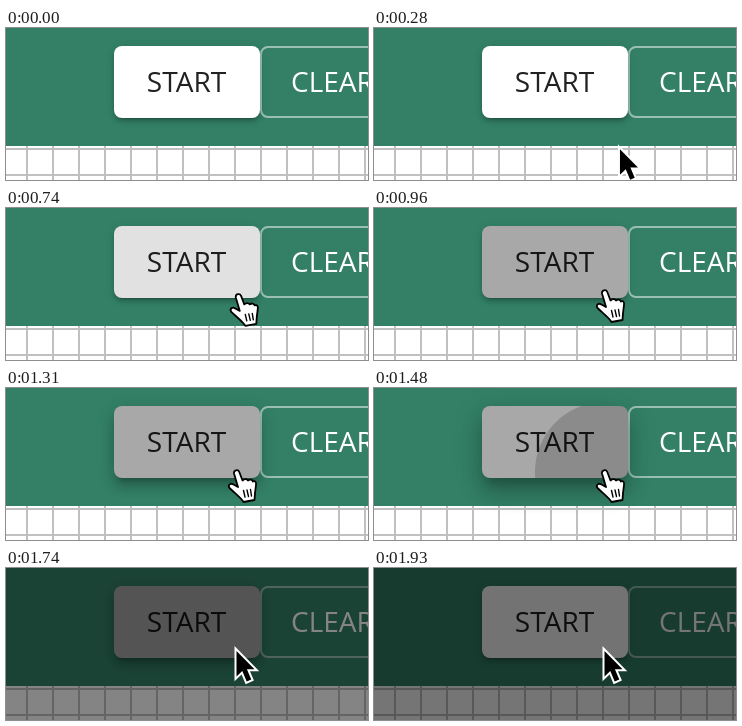
These frames come from a looping animation (362 px wide and 152 px high, 2.34 s). An HTML page:

```html
<!DOCTYPE html>
<html lang="en">
<head>
<meta charset="utf-8">
<style>
  html, body { margin: 0; width: 100%; height: 100%; overflow: hidden; }
  #stage { position: relative; width: 362px; height: 152px; overflow: hidden; background: #fff; }
  #stage > * { position: absolute; }
  svg { left: 0; top: 0; }
  #start { left: 108px; top: 18px; width: 146px; height: 72px; border-radius: 8px; }
  #overlay { inset: 0; background: #000; }
  text { font: 500 28px "Open Sans", "Noto Sans", sans-serif; }
</style>
</head>
<body>
<div id="stage">
  <svg width="362" height="152">
    <defs>
      <pattern id="grid" x="20" y="120" width="26" height="26" patternUnits="userSpaceOnUse">
        <path d="M0 1H26M1 0V26" stroke="#c0c0c0" stroke-width="2"/>
      </pattern>
    </defs>
    <rect y="118" width="362" height="34" fill="url(#grid)"/>
    <rect width="362" height="118" fill="#338067"/>
    <rect x="255" y="19" width="150" height="70" rx="7" fill="none" stroke="#fff" stroke-opacity=".5" stroke-width="2"/>
    <text x="285" y="64" fill="#fff">CLEAR</text>
  </svg>
  <div id="start"></div>
  <svg width="362" height="152">
    <text x="180.5" y="64" text-anchor="middle" fill="#000" fill-opacity=".87">START</text>
  </svg>
  <div id="overlay"></div>
  <svg width="362" height="152">
    <g id="cursor">
      <path id="arrow" d="M0 0V25.5L5.8 20L10.2 30.5L14.8 28.5L10.4 18.3H18Z" stroke="#fff" stroke-width="4" paint-order="stroke" stroke-miterlimit="6"/>
      <g id="hand" stroke="#000" stroke-width="1.8" stroke-linejoin="round" stroke-linecap="round">
        <path fill="#fff" d="M-2.5 2.5C-3 -1 1.5 -2 2.8 1L6 9.5C8 7.5 10.5 8 11.5 9.5C13.5 8 15.5 8.5 16.5 10.5C18.5 9.5 20 11 19.5 14L18.5 22L18 29L7 31C4 26 -2 22 -7 17C-9 14 -6 11.5 -3 13.5L1.5 16Z"/>
        <path fill="none" stroke-width="1.4" d="M7 19.5L8.5 26M10.5 19L12 25.5M14 18.5L15 25"/>
      </g>
    </g>
  </svg>
</div>
<script>
const LOOP = 2340;
const byId = id => document.getElementById(id);
const [start, overlay, cursor, arrow, hand] =
  ['start', 'overlay', 'cursor', 'arrow', 'hand'].map(byId);

// Standard material curve, cubic-bezier(.4, 0, .2, 1).
function ease(x) {
  if (x <= 0) return 0;
  if (x >= 1) return 1;
  let lo = 0, hi = 1;
  for (let i = 0; i < 16; i++) {
    const s = (lo + hi) / 2, r = 1 - s;
    if (1.2 * s * r * r + .6 * s * s * r + s ** 3 < x) lo = s; else hi = s;
  }
  return 3 * lo * lo * (1 - lo) + lo ** 3;
}

const progress = (t, from, length) => Math.min(1, Math.max(0, (t - from) / length));
const easeFrom = (t, from, length) => ease((t - from) / length);

// The picture rests between the hover, the press and the end.
function pausedTime(t) {
  if (t >= 960 && t < 1310) return 960;
  if (t >= 1790 && t < 1930) return 1790;
  return Math.min(t, 1930);
}

function drawButton(t) {
  const hover = easeFrom(t, 668, 250) - easeFrom(t, 1655, 250);
  const shade = Math.round(255 - 87 * hover);

  const grow = easeFrom(t, 1290, 550);
  const alpha = grow && .87 * (.1 + .2 * grow) * (1 - easeFrom(t, 1680, 330));
  const radius = 141 * grow;
  start.style.background =
    `radial-gradient(circle at 123px 66px, rgba(0,0,0,${alpha}) ${radius}px, transparent ${radius + 1}px) rgb(${shade},${shade},${shade})`;

  const lift = easeFrom(t, 1220, 280) - easeFrom(t, 1680, 130);
  start.style.boxShadow = `
    0 ${6 + 4 * lift}px ${2 + 8 * lift}px -5px rgba(0,0,0,.2),
    0 ${4 + 12 * lift}px ${4 + 16 * lift}px ${2 * lift}px rgba(0,0,0,.14),
    0 ${2 + 4 * lift}px ${10 + 18 * lift}px ${4 * lift}px rgba(0,0,0,.12)`;
}

function drawCursor(t) {
  const approach = progress(t, 30, 510);
  const settle = 1 - (1 - progress(t, 610, 350)) ** 2.4;
  const x = 248 - 12 * approach ** 2.5 - 5.5 * settle;
  const y = 153 - 58 * approach ** .85 - 12 * settle;
  const pointing = t >= 660 && t < 1670;
  cursor.setAttribute('transform', `translate(${x} ${y})`);
  cursor.style.display = t < 30 ? 'none' : '';
  hand.style.display = pointing ? '' : 'none';
  arrow.style.display = pointing ? 'none' : '';
}

function render(now) {
  const t = pausedTime(now);
  drawButton(t);
  drawCursor(t);
  overlay.style.opacity = .54 * easeFrom(t, 1660, 130);
}

const origin = performance.now();
function tick() {
  render((performance.now() - origin) % LOOP);
  requestAnimationFrame(tick);
}
tick();
</script>
</body>
</html>
```
